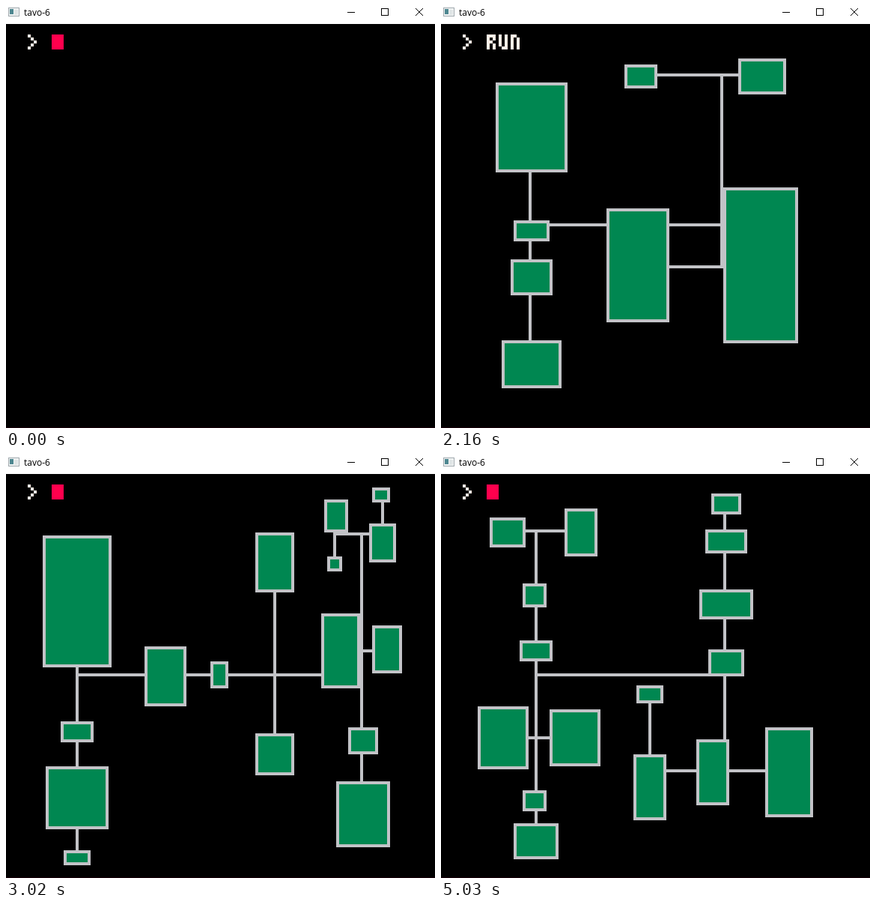
Animation of 573 by 563 pixels, one loop 5100 ms. Source, as an HTML page:

```html
<!DOCTYPE html>
<html lang="en">
<head>
<meta charset="utf-8">
<title>Room generator</title>
<style>
  html, body { margin: 0; width: 100%; height: 100%; overflow: hidden; background: #000; }
  svg { display: block; shape-rendering: crispEdges; }
  .title { font: 12px "Open Sans", "Noto Sans", sans-serif; fill: #000; }
  .wall, .corridor { fill: #c2c3c7; }
  .floor { fill: #008751; }
  .text { fill: #fff1e8; }
  .cursor { fill: #ff004d; }
</style>
</head>
<body>
<svg width="573" height="563" viewBox="0 0 573 563">
  <rect width="573" height="563"/>
  <rect y="562" width="573" height="1" fill="#180008"/>
  <rect width="573" height="24" fill="#fff"/>
  <g>
    <rect x="3" y="2" width="15" height="12" fill="#a0a9ae"/>
    <rect x="4" y="3" width="13" height="10" fill="#f2f4f4"/>
    <rect x="5" y="4" width="5" height="7" fill="#4d8790"/>
    <rect x="11" y="5" width="5" height="7" fill="#e0e5e6"/>
  </g>
  <text class="title" x="24" y="13">tavo-6</text>
  <g fill="none" stroke="#000">
    <path d="M456 8.5h10M501.5 3.5h9v9h-9z"/>
    <path d="M547 3l10 10M557 3l-10 10" shape-rendering="auto"/>
  </g>
  <g id="screen" transform="translate(29 38) scale(4)"></g>
</svg>
<script>
const LOOP = 5100;
const SIZE = 127;
const BLINK = 230;  // how long the cursor stays dark
const TYPING = 230; // from the first letter to Enter
const pixels = document.getElementById('screen');

function add(parent, tag, attrs = {}) {
  const node = document.createElementNS('http://www.w3.org/2000/svg', tag);
  for (const name in attrs) node.setAttribute(name, attrs[name]);
  return parent.appendChild(node);
}

function rect(parent, type, x, y, width, height) {
  return add(parent, 'rect', { class: type, x, y, width, height });
}

// A map is an area cut again and again. Each part holds a centred room,
// and a corridor joins the centres of the first and last part of a cut.
const middle = ([from, to]) => (from + to) / 2;

const room = (w, h) => (xs, ys, layers) => {
  const x = Math.floor(middle(xs) - (w - 1) / 2);
  const y = Math.floor(middle(ys) - (h - 1) / 2);
  rect(layers.rooms, 'wall', x, y, w, h);
  rect(layers.rooms, 'floor', x + 1, y + 1, w - 2, h - 2);
};

function slices([from, to], cuts) {
  const edges = [from, ...cuts, to];
  return edges.slice(1).map((edge, i) => [edges[i], edge]);
}

function span(parts) {
  const start = Math.floor(middle(parts[0]));
  return [start, Math.floor(middle(parts.at(-1))) - start + 1];
}

const columns = (cuts, ...areas) => (xs, ys, layers) => {
  const parts = slices(xs, cuts);
  const [x, length] = span(parts);
  rect(layers.corridors, 'corridor', x, Math.floor(middle(ys)), length, 1);
  areas.forEach((area, i) => area(parts[i], ys, layers));
};

const rows = (cuts, ...areas) => (xs, ys, layers) => {
  const parts = slices(ys, cuts);
  const [y, length] = span(parts);
  rect(layers.corridors, 'corridor', Math.floor(middle(xs)), y, 1, length);
  areas.forEach((area, i) => area(xs, parts[i], layers));
};

function drawMap(area) {
  const group = add(pixels, 'g');
  area([0, SIZE], [0, SIZE], { corridors: add(group, 'g'), rooms: add(group, 'g') });
  return group;
}

const maps = [
  columns([45],
    rows([61, 69, 93], room(24, 30), room(12, 7), room(14, 12), room(20, 16)),
    rows([27],
      columns([73], room(11, 8), room(16, 12)),
      columns([71], room(21, 38), room(25, 52)))),

  columns([23, 59],
    rows([76], room(10, 13), room(14, 20)),
    rows([83], room(19, 32), room(23, 17)),
    rows([19, 74],
      columns([89], room(19, 14), room(21, 14)),
      room(17, 12),
      room(34, 26))),

  columns([33, 58, 69, 96],
    rows([77, 87, 121], room(23, 44), room(11, 7), room(21, 21), room(9, 5)),
    room(14, 20),
    room(6, 9),
    rows([52], room(13, 20), room(13, 14)),
    rows([33, 77, 93],
      columns([109],
        rows([20], room(8, 11), room(5, 5)),
        rows([6], room(6, 5), room(9, 13))),
      columns([112], room(13, 25), room(10, 16)),
      room(10, 9),
      room(18, 22))),

  columns([48],
    rows([31, 43, 67, 101, 110],
      columns([30], room(12, 10), room(11, 16)),
      room(8, 8),
      room(11, 7),
      columns([26], room(17, 21), room(17, 19)),
      room(8, 7),
      room(15, 12)),
    rows([12, 25, 54, 64],
      room(10, 7),
      room(14, 8),
      room(18, 10),
      room(12, 9),
      columns([76, 90],
        rows([75], room(9, 6), room(11, 22)),
        room(11, 22),
        room(16, 30))))
].map(drawMap);

const glyphs = {
  '>': '#.. .#. ..# .#. #..',
  R: '### #.# ##. #.# #.#',
  U: '#.# #.# #.# #.# .##',
  N: '##. #.# #.# #.# #.#'
};

function drawGlyph(char, x) {
  const d = glyphs[char].split(' ').flatMap((row, y) =>
    [...row].map((dot, i) => dot === '#' ? `M${x + i} ${y}h1v1h-1z` : '')).join('');
  return add(pixels, 'path', { class: 'text', d });
}

drawGlyph('>', 0);
const letters = [...'RUN'].map((char, i) => drawGlyph(char, 8 + 4 * i));
const cursor = rect(pixels, 'cursor', 8, 0, 4, 5);

// Each run: when typing begins, and when its map and a new prompt appear.
const runs = [
  { type: 380, done: 1470 },
  { type: 1930, done: 2330 },
  { type: 2710, done: 3020 },
  { type: 3330, done: 4260 }
];
const blinks = [300, 1700, 2480, 3250, 4260, 4800];

const show = (node, on) => node.setAttribute('visibility', on ? 'visible' : 'hidden');

function render(time) {
  const finished = runs.filter(run => run.done <= time).length;
  const run = runs[finished];
  const keys = run && time >= run.type
    ? 1 + Math.floor((time - run.type) * letters.length / TYPING) : 0;
  const dark = blinks.some(start => time >= start && time < start + BLINK);

  maps.forEach((map, i) => show(map, i === finished - 1));
  letters.forEach((letter, i) => show(letter, i < keys));
  show(cursor, !dark && keys <= letters.length);
  cursor.setAttribute('x', 8 + 4 * keys);
}

const start = performance.now();
function tick() {
  render(Math.max(0, performance.now() - start) % LOOP);
  requestAnimationFrame(tick);
}
tick();
</script>
</body>
</html>
```
